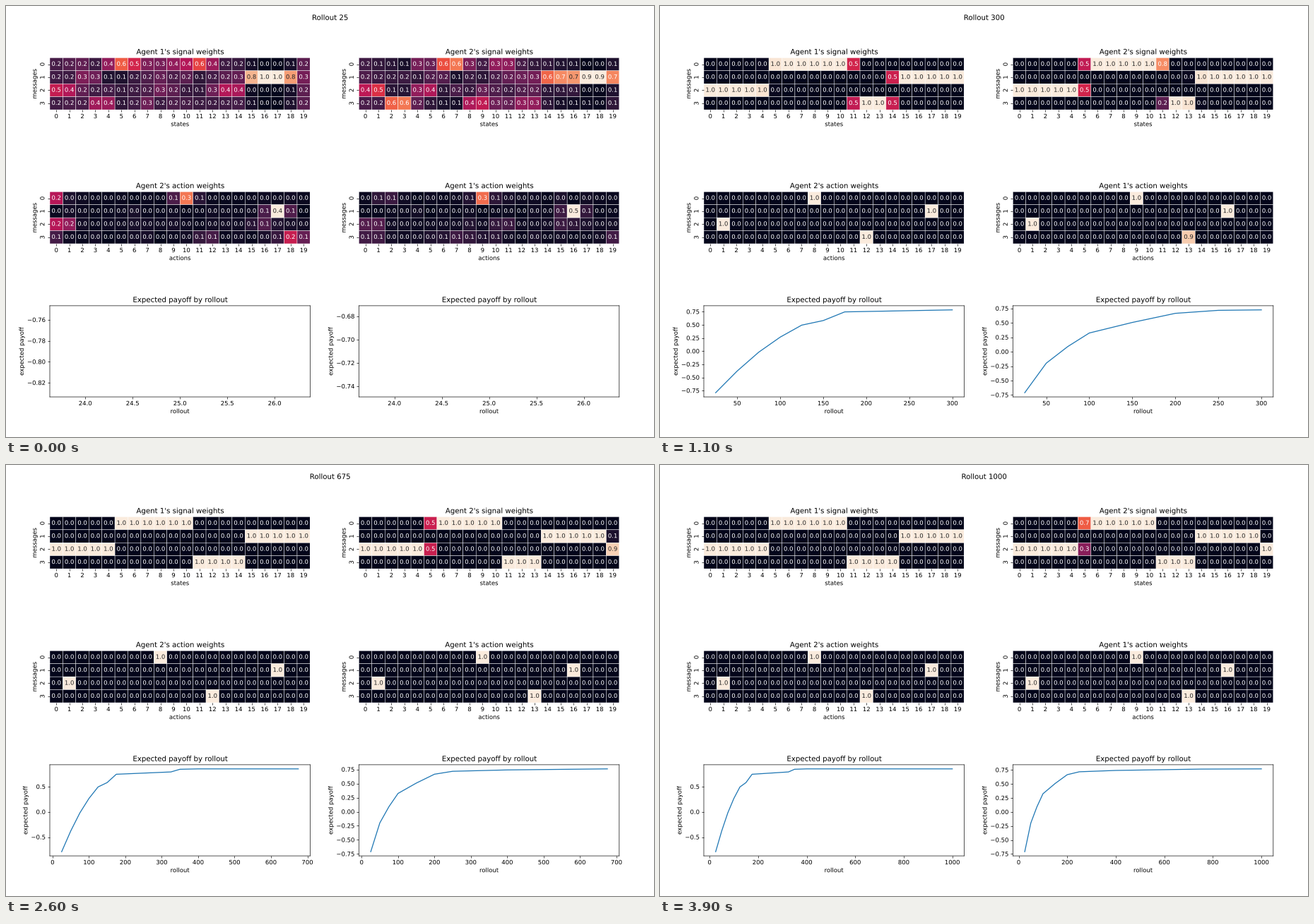
These frames come from a looping animation (917x611 px, 4000 ms). A matplotlib script:

```python
import numpy as np
import matplotlib.pyplot as plt
from matplotlib import patheffects
from matplotlib.animation import FuncAnimation
from matplotlib.colors import LinearSegmentedColormap

W, H, DPI = 917, 611, 61.1
FRAMES, STEP = 40, 25
ROWS, COLS = 4, 20
AX_W, HEAT_H, PLOT_H = 368.4, 73.7, 129.2
LEFT, RIGHT = 62.0, 499.4
SIGNAL_TOP, ACTION_TOP, PLOT_TOP = 73.4, 263.3, 424.9

# Text drawn as paths and unsnapped lines keep sub-pixel positions.
plt.rcParams.update({
    "font.family": "DejaVu Sans",
    "text.hinting": "none",
    "path.snap": False,
    "path.effects": [patheffects.Normal()],
})

ROCKET = LinearSegmentedColormap.from_list("rocket", [
    "#03051a", "#221331", "#451c47", "#6a1f56", "#921c5b", "#b91657",
    "#d92847", "#ed513e", "#f47c56", "#f6a47b", "#f7c9aa", "#faebdd"])

cols = np.arange(COLS)
rollouts = STEP * np.arange(1, FRAMES + 1)


def bumpy(seed, base, bumps):
    """Noisy floor plus bell curves given as (row, centre, width, height)."""
    rng = np.random.default_rng(seed)
    m = base * np.exp(.25 * rng.standard_normal((ROWS, COLS)))
    for row, centre, width, height in bumps:
        m[row] += height * np.exp(-((cols - centre) / width) ** 2)
    return m


def signal(seed, bumps, edges):
    """Softmax that sharpens until each message owns a range of states.

    Each edge between two ranges moves along {step: position}.
    """
    start = np.log(bumpy(seed, .2, bumps))
    owners = (2, 0, 3, 1, 2)

    def weights(i):
        cuts = [np.interp(i, list(e), list(e.values())) for e in edges]
        dist = np.full((ROWS, COLS), 99.)
        for m, lo, hi in zip(owners, [-9] + cuts, cuts + [39]):
            dist[m] = np.minimum(dist[m], np.maximum(lo - cols, cols - hi))
        w = np.exp(start * np.exp(-i / 4) - min(.35 * i, 6) * dist)
        return w / w.sum(axis=0)

    return weights


def action(seed, bumps, targets, rates):
    """Each message's spread of actions collapses onto one target."""
    start = bumpy(seed, .025, bumps)
    start /= start.sum(axis=1, keepdims=True)
    goal = np.eye(COLS)[list(targets)]
    rates = np.array(rates)[:, None]

    def weights(i):
        left = np.exp(-rates * i * i)
        return start * left + goal * (1 - left)

    return weights


signal_1 = signal(
    1,
    [(0, 5.3, 1, .75), (0, 10.6, 1.5, .5), (1, 16.4, 1, 20),
     (2, .4, .9, .5), (2, 13.3, .8, .5), (3, 3.5, .8, .3)],
    [{0: 4.5}, {8: 11.5, 14: 10.5}, {8: 13.5, 14: 14.5}, {0: 29}])

signal_2 = signal(
    2,
    [(0, 6.5, .8, 1), (0, 10.3, .8, .2), (1, 17.4, 1.2, 5.5),
     (1, 14.6, 1, 1.1), (2, .5, .8, .45), (2, 4.5, .8, .3),
     (3, 2.5, .8, 1), (3, 9, .8, .25), (3, 12.5, .8, .25)],
    [{0: 4.9, 7: 5.04, 15: 4.975, 22: 4.975, 31: 5.03, 39: 4.945},
     {7: 11.5, 15: 10.8, 18: 10.5}, {0: 13.5},
     {7: 20.5, 15: 19.2, 22: 19.02, 31: 18.5}])

action_2 = action(
    3,
    [(0, 0, .8, .15), (0, 10, .7, .27), (1, 17, .8, .4),
     (2, .4, .9, .17), (2, 16, 1.2, .06),
     (3, 0, .5, .06), (3, 11.5, .8, .06), (3, 18.2, 1, .17)],
    (8, 17, 1, 12), (.2, .4, .08, .07))

action_1 = action(
    4,
    [(0, 1.5, .8, .06), (0, 9, .7, .28), (1, 16, .7, .45),
     (2, .5, .8, .08), (2, 10.5, .8, .05), (2, 15.5, .8, .05),
     (3, .5, .8, .08), (3, 7.5, 2.5, .05), (3, 19, .8, .07)],
    (9, 16, 1, 13), (.25, .4, .08, .02))

payoff_1 = np.interp(
    rollouts,
    [25, 50, 75, 100, 125, 150, 175, 325, 350, 400],
    [-.79, -.378, -.02, .267, .495, .582, .747, .793, .846, .854])
payoff_2 = np.interp(
    rollouts,
    [25, 50, 75, 100, 150, 200, 250, 400, 750, 1000],
    [-.71, -.198, .09, .325, .508, .666, .718, .742, .766, .77])


def luminance(rgba):
    c = rgba[..., :3]
    lin = np.where(c <= .03928, c / 12.92, ((c + .055) / 1.055) ** 2.4)
    return lin @ [.2126, .7152, .0722]


fig = plt.figure(figsize=((W + 1e-6) / DPI, (H + 1e-6) / DPI), dpi=DPI,
                 facecolor="white")


def add_axes(x, top, h, title, xlabel, ylabel):
    ax = fig.add_axes([x / W, 1 - (top + h) / H, AX_W / W, h / H])
    ax.set_title(title)
    ax.set_xlabel(xlabel)
    ax.set_ylabel(ylabel)
    return ax


class Heatmap:
    def __init__(self, x, top, title, xlabel, weights):
        self.weights = weights
        ax = add_axes(x, top, HEAT_H, title, xlabel, "messages")
        self.mesh = ax.pcolormesh(np.zeros((ROWS, COLS)), cmap=ROCKET,
                                  edgecolors="white", linewidth=.5,
                                  antialiased=True)
        ax.set(xlim=(0, COLS), ylim=(ROWS, 0))
        ax.set_xticks(cols + .5, cols)
        ax.set_yticks(np.arange(ROWS) + .5, range(ROWS), rotation=90,
                      va="center")
        ax.spines[:].set_visible(False)
        self.labels = [ax.text(c + .5, r + .5, "", ha="center", va="center")
                       for r in range(ROWS) for c in range(COLS)]

    def update(self, i):
        m = self.weights(i)
        self.mesh.set_array(m)
        self.mesh.set_clim(m.min(), m.max())
        lum = luminance(self.mesh.to_rgba(m.ravel()))
        for label, v, l in zip(self.labels, m.ravel(), lum):
            label.set_text(f"{v:.1f}")
            label.set_color(".15" if l > .408 else "white")


class Payoff:
    def __init__(self, x, values):
        self.values = values
        self.ax = add_axes(x, PLOT_TOP, PLOT_H, "Expected payoff by rollout",
                           "rollout", "expected payoff")
        self.line, = self.ax.plot([], [])

    def update(self, i):
        self.line.set_data(rollouts[:i + 1], self.values[:i + 1])
        self.ax.relim()
        self.ax.autoscale_view()


heading = fig.suptitle("")
panels = [
    Heatmap(LEFT, SIGNAL_TOP, "Agent 1's signal weights", "states", signal_1),
    Heatmap(RIGHT, SIGNAL_TOP, "Agent 2's signal weights", "states", signal_2),
    Heatmap(LEFT, ACTION_TOP, "Agent 2's action weights", "actions", action_2),
    Heatmap(RIGHT, ACTION_TOP, "Agent 1's action weights", "actions", action_1),
    Payoff(LEFT, payoff_1),
    Payoff(RIGHT, payoff_2),
]


def draw(i):
    heading.set_text(f"Rollout {rollouts[i]}")
    for panel in panels:
        panel.update(i)


anim = FuncAnimation(fig, draw, frames=FRAMES, interval=100,
                     init_func=lambda: draw(0), repeat=True)
plt.show()
```
